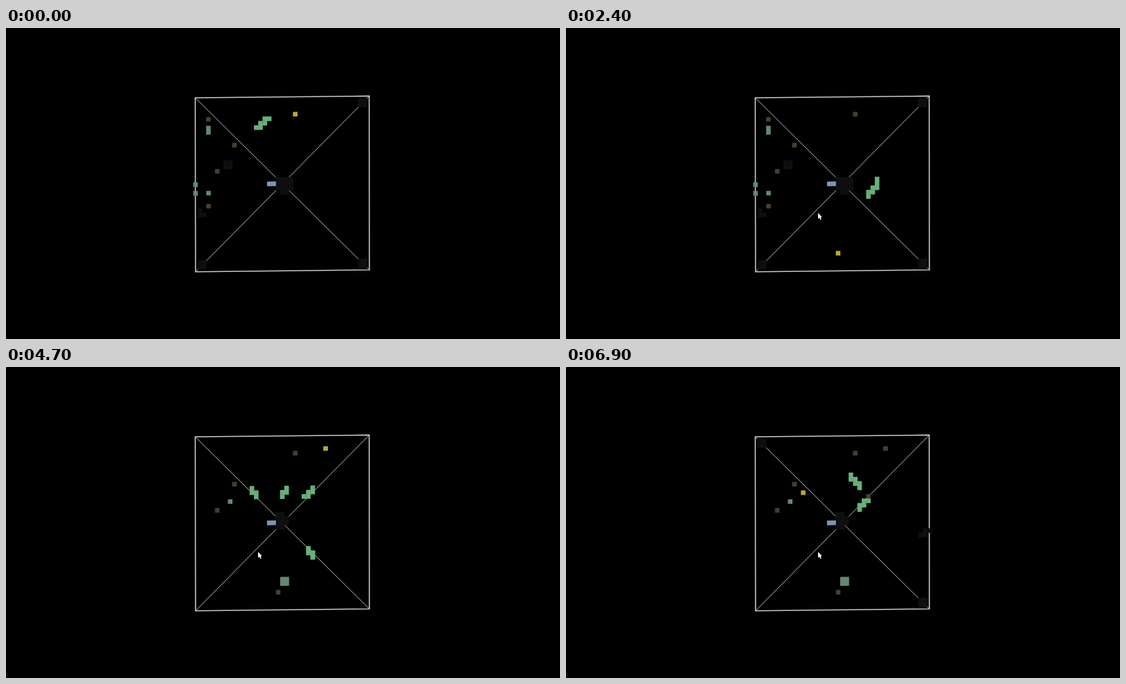
These frames come from a looping animation (800 px wide and 450 px high, 7000 ms). An HTML page with a canvas:

```html
<!DOCTYPE html>
<html lang="en">
<head>
<meta charset="utf-8">
<title>Snakes in a box</title>
<style>
  html, body { margin: 0; width: 100%; height: 100%; overflow: hidden; background: #000; }
  canvas { display: block; width: 800px; height: 450px; }
</style>
</head>
<body>
<canvas id="stage" width="800" height="450"></canvas>
<script>
const LOOP = 7000, FRAME = 100, RESET = 3700, MID = 20;
const GREEN = '#6aae7c', TEAL = '#64876f', DARK = '#0f0f11', BLUE = '#8094b6';
const FOOD = '#b5a93b', EATEN = '#43412d';
const SIGNS = [-1, 1];
const ctx = document.getElementById('stage').getContext('2d');

// Food appears in this order, each piece once the one before is eaten.
const meals = [[9, 11], [5, 17], [23, 4], [19, 36], [30, 3], [26, 14], [11, 13]];

// Walks from turn to turn in single-cell staircase moves.
function walk(...turns) {
  let [x, y] = turns[0];
  const cells = [[x, y]];
  for (const [tx, ty] of turns.slice(1)) {
    const dx = Math.abs(tx - x), dy = Math.abs(ty - y);
    const sx = Math.sign(tx - x), sy = Math.sign(ty - y);
    let nx = 0, ny = 0;
    while (nx < dx || ny < dy) {
      if ((2 * ny + 1) * dx < (2 * nx + 1) * dy) { ny++; y += sy; }
      else { nx++; x += sx; }
      cells.push([x, y]);
    }
  }
  return cells;
}

function snake(size, ...turns) {
  const path = walk(...turns);
  const [x, y] = path[path.length - 1];
  return {
    size, path,
    meals: meals.map(m => path.findIndex(c => c[0] === m[0] && c[1] === m[1])),
    hitsWall: Math.max(Math.abs(x - MID), Math.abs(y - MID)) >= MID - 1
  };
}
const hatch = (...turns) => snake(4, [MID - 3, MID], [MID, MID], ...turns);

// Two hatchlings run straight into opposite corners.
const runners = SIGNS.map(s =>
  hatch([MID + 7 * s, MID + 8 * s], [MID + 19 * s, MID + 19 * s], [MID + 19 * s, MID + 18 * s]));

const hunt = {
  eaten: 2,
  head: t => 5.6 + t / 61.9,
  snakes: [snake(6, [14, 7], [17, 5], [19, 3], meals[2], [29, 11], [30, 13], [28, 14],
    [28, 20], [22, 29], [23, 29], meals[3])],
  scenery: drawOldRemains
};
const swarm = {
  eaten: 4,
  head(t) {
    const s = (t - 3800) / 1000;
    return 4 + 15.1 * s + 0.56 * s * s;
  },
  snakes: [
    ...runners,
    hatch([27, 28], [30, 31], [40, 22]),
    hatch([17, 16], [21, 12], [27, 5], [31, 7], [32, 9], meals[5], [24, 17]),
    hatch([27, 12], meals[4], [33, 4], [31, 6], [29, 7], [22, 9], [24, 12])
  ],
  scenery: drawNewRemains
};

function block(color, x, y, w = 1, h = 1) {
  ctx.fillStyle = color;
  ctx.fillRect(x - 0.53, y - 0.53, w + 0.06, h + 0.06);
}

// Dark remains: every cell within a radius.
function blob(cx, cy, r) {
  for (let x = Math.ceil(cx - r); x <= cx + r; x++) {
    for (let y = Math.ceil(cy - r); y <= cy + r; y++) {
      if (Math.hypot(x - cx, y - cy) <= r) block(DARK, x, y);
    }
  }
}

function drawOldRemains() {
  blob(20.5, 20.2, 1.95);
  blob(7.5, 15.5, 0.8);
  blob(1.4, 26.6, 0.8);
  for (const sx of SIGNS) {
    for (const sy of SIGNS) {
      if (sx + sy >= 0) blob(MID + 18.5 * sx, MID + 18.5 * sy, 0.8);
    }
  }
  block(TEAL, 3, 7, 1, 2);
  block(TEAL, 3, 22);
  for (const y of [20, 22]) block(TEAL, 0, y);
  for (const y of [5, 25]) block(EATEN, 3, y);
}

function drawNewRemains(t) {
  if (t >= 4000) blob(19.8, 19.5, 1.75);
  block(TEAL, 8, 15);
  block(TEAL, 20, 33, 2, 2);
}

function drawFood(world, head) {
  let next = world.eaten;
  const reached = s => s.meals[next] >= 0 && s.meals[next] <= head;
  while (world.snakes.some(reached)) next++;
  meals.slice(0, next + 1).forEach((m, i) => block(i < next ? EATEN : FOOD, ...m));
}

function drawSnake({ size, path, meals }, head, color) {
  const length = size + meals.filter(i => i >= 0 && i <= head).length;
  const end = Math.min(head + 1, path.length);
  path.slice(Math.max(0, end - length), end).forEach(c => block(color, ...c));
}

function drawWorld(world, t) {
  const head = Math.floor(world.head(t));
  const dead = s => s.hitsWall && head >= s.path.length;
  world.snakes.filter(dead).forEach(s => drawSnake(s, head, DARK));
  world.scenery(t);
  block(BLUE, 17, 20, 2);
  drawFood(world, head);
  world.snakes.filter(s => !dead(s)).forEach(s => drawSnake(s, head, GREEN));
}

function line(color, width, ...points) {
  ctx.strokeStyle = color;
  ctx.lineWidth = width;
  ctx.beginPath();
  points.forEach(p => ctx.lineTo(...p));
  ctx.stroke();
}

function drawBox() {
  const a = [273.3, 101], b = [524.5, 98.5], c = [524.7, 350], d = [273.7, 352.8];
  line('#bcbcbc', 1, a, c);
  line('#bcbcbc', 1, d, b);
  line('#c6c9c8', 1.6, a, b, c, d, a, b);
}

// The pointer glides in from the left and stays.
function drawCursor(t) {
  if (t < 1700) return;
  const p = Math.min(1, (t - 1700) / 700), e = 1 - (1 - p) ** 2;
  ctx.save();
  ctx.translate(5 + 359 * e, 335.5 - 68 * e);
  ctx.fillStyle = '#fff';
  ctx.fill(new Path2D('M0 0V8.6L1.9 6.9 3.3 10 4.8 9.3 3.4 6.3H5.8Z'));
  ctx.restore();
}

function draw(now) {
  const t = Math.floor(now % LOOP / FRAME) * FRAME;
  ctx.fillStyle = '#000';
  ctx.fillRect(0, 0, 800, 450);
  drawBox();
  ctx.save();
  ctx.transform(6.27, -0.062, 0.012, 6.28, 273.4, 101);
  drawWorld(t < RESET ? hunt : swarm, t);
  ctx.restore();
  drawCursor(t);
}

const start = performance.now();
function tick() {
  draw(performance.now() - start);
  requestAnimationFrame(tick);
}
tick();
</script>
</body>
</html>
```
